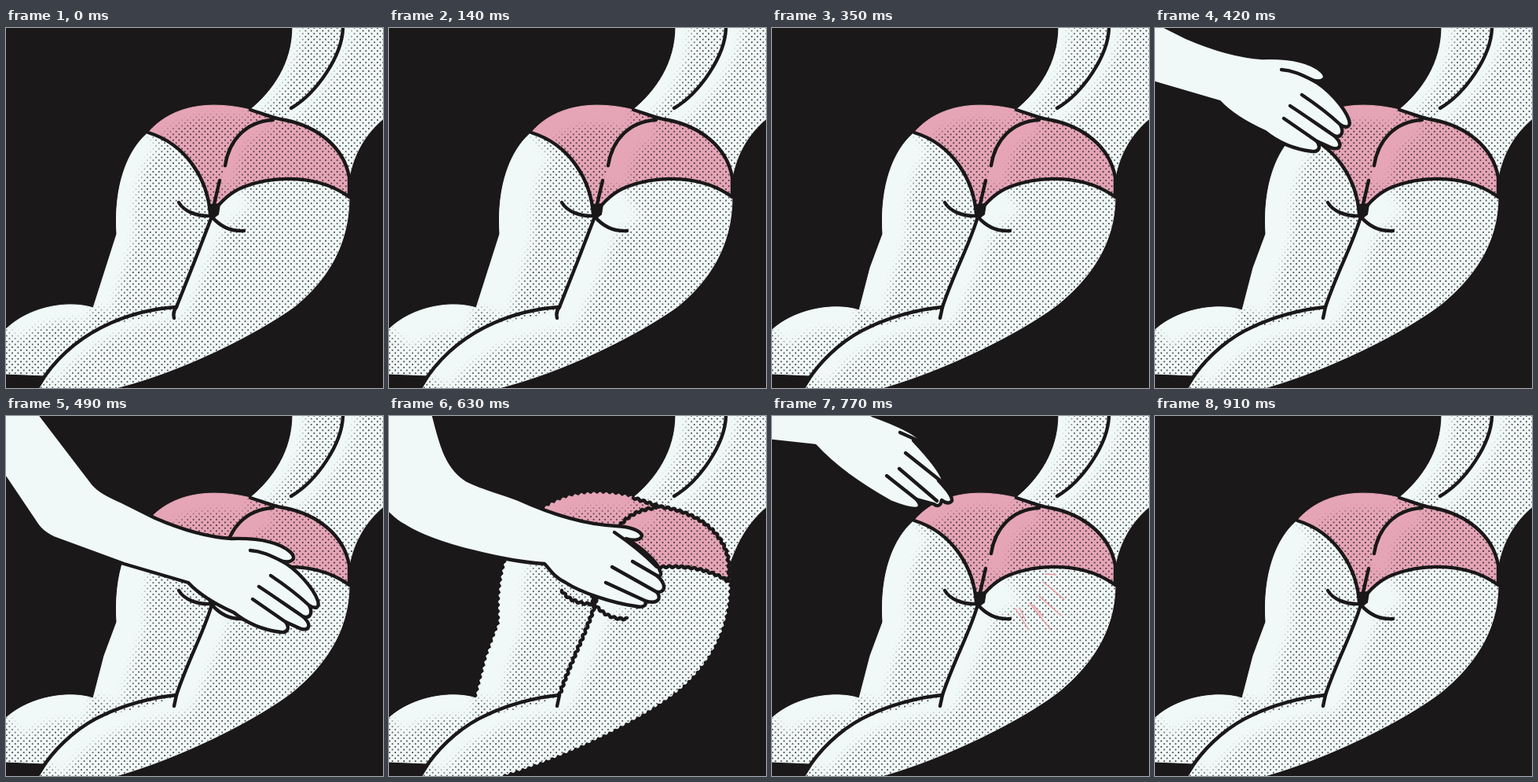
An HTML page that plays this animation: 480 by 458 pixels, repeating every 0.98 s.

```html
<!DOCTYPE html>
<html lang="en">
<head>
<meta charset="utf-8">
<title>Halftone loop</title>
<style>
html, body { margin: 0; width: 100%; height: 100%; overflow: hidden; background: #1a1819; }
svg { display: block; width: 480px; height: 458px; }
.line { fill: none; stroke: #1a1819; stroke-width: 4.4; stroke-linecap: round; stroke-linejoin: round; }
.skin { fill: #f1f8f8; stroke: #f1f8f8; }
.pink { fill: #e6a5b7; stroke: #e6a5b7; }
.glow { fill: none; stroke: #000; stroke-linejoin: round; filter: url(#soft); }
.hand { fill: #f1f8f8; stroke: #1a1819; stroke-width: 4.4; stroke-linejoin: round; }
.mark { fill: none; stroke: #ef9a9f; stroke-width: 1.3; stroke-linecap: round; }
.knot { fill: #1a1819; stroke: #1a1819; stroke-width: 2; stroke-linejoin: round; }
</style>
</head>
<body>
<svg viewBox="0 0 480 458">
  <defs>
    <pattern id="dots" width="7.32" height="7.32" patternUnits="userSpaceOnUse" patternTransform="translate(-1.08 1.76)">
      <g fill="#1a1819"><circle cx="1.83" cy="1.83" r=".95"/><circle cx="5.49" cy="5.49" r=".95"/></g>
    </pattern>
    <filter id="soft" filterUnits="userSpaceOnUse" x="-60" y="-60" width="600" height="580">
      <feGaussianBlur stdDeviation="6"/>
    </filter>
  </defs>
  <g id="stage"></g>
</svg>
<script>
const STEP = 70, COUNT = 14;
const stage = document.getElementById('stage');

// Highlight scale for each step: the halftone edge breathes.
const light = [.7, .95, 1.25, 1.15, 1.05, .95, 1, 1.08, 1, .92, 1, .95, 1.04, 1];

const spine = 'M429 -4C430 35 394 84 363 102';
const leftHem = 'M181 133C230 148 257 193 260 237';
const crease = 'M340 117C305 119 284 143 279 175';

// k settles the knees and the outer contour, q squeezes the right side.
function figure(k, q) {
  const side = 437 - q, hemY = 215 - q;
  const shin = `M0 ${383 + k / 3}C30 ${354 + k} 80 ${346 + k} 111 ${356 + k}`;
  const thigh = `M181 133C155 155 137 200 141 262L${k ? '125 305' : '126 309'}L111 ${356 + k}`;
  const knee = k ? 'C185 358 150 368 125 380C95 393 68 417 50 442' : 'C170 358 97 377 50 442';
  const kneeBack = k ? 'C68 417 95 393 125 380C150 368 185 358 217 355' : 'C97 377 170 358 217 355';
  const inner = `M262 240${k ? 'C252 275 232 310' : 'L240 297L'} 217 355`;
  const rightHem = `M262 237C272 222 285 209 303 202C345 186 400 188 ${side} ${hemY}`;
  const waistEnd = `355 117C395 125 430 150 ${side} 190L${side} ${hemY}`;
  return {
    inner, rightHem,
    waist: 'M311 104C330 110 345 116 ' + waistEnd,
    knee: 'M217 355' + knee + 'L38 461',
    parts: [
      { d: 'M365 -2C365 45 340 80 311 104L355 117L363 102C394 84 430 35 429 -4Z',
        hi: 'M365 -10C365 45 340 80 305 110', w: 34 },
      { d: `M429 -4C430 35 394 84 363 102L350 117C395 125 430 150 ${side} 190C443 160 457 135 481 115V-2Z`,
        hi: 'M431 -10C430 35 394 84 350 112', w: 34 },
      { d: shin + `L122 ${378 + k}C90 395 68 415 50 442L0 440Z`, hi: shin, w: 62 },
      { d: thigh + `L120 ${380 + k}L200 364L217 355L262 240L260 237C257 193 230 148 181 133Z`,
        hi: thigh, w: 70, shake: 1 },
      { d: rightHem + `C${side} ${278 - k} ${407 - k} ${322 - k} ${368 - k} ${354 - k}` +
           `C318 ${390 - k} 222 ${438 - k} 140 458L38 460L50 442${kneeBack}L262 240Z`,
        hi: 'M305 214L266 240L217 355' + knee, w: 52, shake: 1 },
      { d: leftHem + 'L279 175C284 143 305 119 340 117L311 104C262 92 212 97 181 133Z',
        hi: 'M175 142C212 97 262 92 311 104', w: 42, pink: 1, shake: 1 },
      { d: rightHem + `L${side} 190C430 150 395 125 355 117L340 117C305 119 284 143 279 175Z`,
        hi: 'M276 200C284 143 305 119 340 117', w: 46, pink: 1, shake: 1 }
    ]
  };
}

// Turns a path into a fine wave along itself.
function ripple(d) {
  const p = document.createElementNS('http://www.w3.org/2000/svg', 'path');
  p.setAttribute('d', d);
  const size = p.getTotalLength(), points = [];
  for (let s = 0; s <= size; s += 1.5) {
    const a = p.getPointAtLength(s), b = p.getPointAtLength(Math.max(s - 1, 0)), c = p.getPointAtLength(s + 1);
    const len = Math.hypot(c.x - b.x, c.y - b.y) || 1, wave = 1.2 * Math.sin(s * Math.PI / 4) / len;
    points.push((a.x - (c.y - b.y) * wave).toFixed(1) + ' ' + (a.y + (c.x - b.x) * wave).toFixed(1));
  }
  return 'M' + points.join('L');
}

const path = (cls, d) => `<path class="${cls}" d="${d}"/>`;
const lines = (...ds) => path('line', ds.join(''));

function halftone(p, i, s) {
  return `<clipPath id="c${i}"><path d="${p.d}"/></clipPath>
    <mask id="m${i}" maskUnits="userSpaceOnUse" x="0" y="0" width="480" height="458">
    <rect width="480" height="458" fill="#fff"/><path class="glow" d="${p.hi}" stroke-width="${p.w * s}"/></mask>
    <g clip-path="url(#c${i})"><rect width="480" height="458" fill="url(#dots)" mask="url(#m${i})"/></g>`;
}

function body(k, s, shake) {
  const f = figure(k, shake ? 4 : 0);
  const bend = shake ? ripple : d => d;
  const soft = [leftHem, f.rightHem, f.waist, crease, f.inner, 'M272 194L262 237',
    'M220 222C227 234 244 240 262 239', 'M262 240C274 254 288 259 303 258'];
  return f.parts.map(p => path(p.pink ? 'pink' : 'skin', p.shake ? bend(p.d) : p.d)).join('') +
    f.parts.map((p, i) => halftone(p, i, s)).join('') +
    lines(spine, f.knee, k ? 'M217 355L214 369' : 'M217 355Q212 361 214 369') +
    lines(...soft.map(bend)) +
    (shake ? '' : path('knot', 'M258 225L272 224L270 237L262 243Z'));
}

const hands = {
  strike: [
    `M-35 -110L45 0L110 85C120 97 135 103 150 110L190 130C220 143 255 154 287 156
     C320 155 347 160 362 173C372 182 362 188 350 184C370 194 392 220 397 235
     C400 246 392 245 386 241C392 253 385 258 378 255C390 266 386 273 376 271L356 262
     C362 270 358 276 350 275C325 272 306 263 290 250C270 241 246 227 232 212
     L150 188L60 155C45 148 40 140 35 132L0 80L-90 -50`,
    'M311 171C325 172 336 177 350 184M337 203C355 215 372 228 386 241M322 217C342 230 360 243 378 255M314 233L356 262'],
  press: [
    `M36 -90L57 0C65 30 72 66 100 82C120 92 145 98 165 106C200 122 245 138 290 140
     C308 141 320 146 322 152C321 158 312 159 302 156C322 168 342 185 345 197
     C348 203 344 205 341 203C354 214 352 225 341 224C348 233 341 240 326 235
     C329 242 322 244 314 242C285 238 245 225 225 212C210 205 205 195 198 188
     C150 185 60 165 20 140C10 135 5 130 0 125L-80 65`,
    'M287 148C305 160 325 176 341 192M284 192L341 224M310 185L341 203M276 212L326 235'],
  lift: [
    `M-20 -70L80 -25L130 0C155 9 180 20 191 31C192 35 186 34 180 31C196 48 214 69 218 81
     C219 86 215 85 212 82C222 93 230 102 229 108C226 112 221 111 216 107
     C215 114 211 116 206 112L184 106C190 113 189 118 183 118C172 118 160 113 150 109
     C110 86 80 65 55 38L0 32L-130 25`,
    'M163 21L190 33M170 47L214 82M162 67L210 108M146 76L184 106']
};

// Step -> [pose, dx, dy]
const moves = {
  6: ['strike', -150, -118], 7: ['strike', 0, 0], 8: ['press', 26, 16], 9: ['press', 0, 0],
  10: ['press', -60, -57], 11: ['lift', 0, 0], 12: ['lift', -108, -68]
};

function hand(n) {
  if (!moves[n]) return '';
  const [pose, x, y] = moves[n], [shape, gaps] = hands[pose];
  return `<g transform="translate(${x} ${y})">${path('hand', shape)}${lines(gaps)}</g>`;
}

const marks = path('mark', `M310 245L327 272M315 244L322 258M328 238L355 272M332 240L345 255
  M340 229L368 254M345 211L372 233M348 201L362 202`);

const scenes = Array.from({ length: COUNT }, (_, n) =>
  body(n > 3 ? 3 : 0, light[n], n >= 8 && n <= 10) +
  (n > 9 && n < 13 ? marks : '') + hand(n));

let shown = -1;
function draw(now) {
  const n = Math.floor(now / STEP) % COUNT;
  if (n !== shown) stage.innerHTML = scenes[shown = n];
  requestAnimationFrame(draw);
}
draw(0);
</script>
</body>
</html>
```
